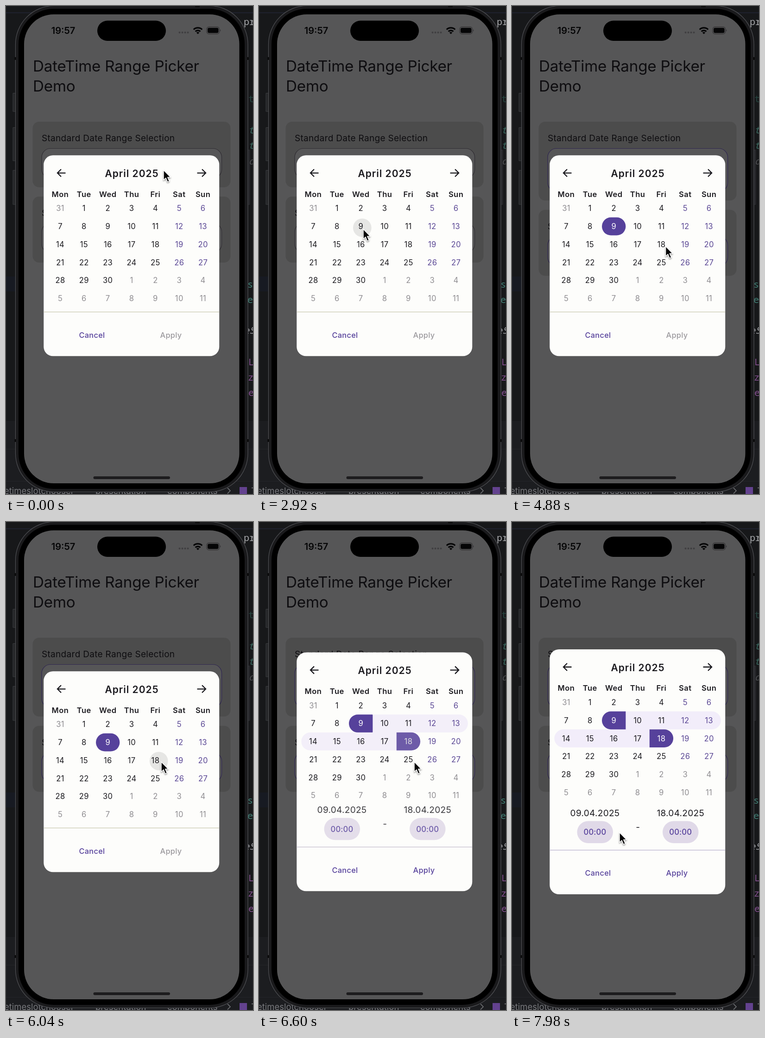
An HTML page for the animation above (8 s loop, 533 by 1050 pixels).

```html
<!DOCTYPE html>
<html lang="en">
<head>
<meta charset="utf-8">
<title>Date range picker</title>
<style>
  html, body { margin: 0; width: 100%; height: 100%; overflow: hidden; background: #17181a; }
  svg { display: block; width: 533px; height: 1050px; font-family: Inter, sans-serif; font-optical-sizing: none; }
  .code { font-family: "Noto Sans Mono", monospace; }
</style>
</head>
<body>
<svg id="stage" viewBox="0 0 533 1050" xmlns="http://www.w3.org/2000/svg">
  <rect width="533" height="1050" fill="#17181a"/>
  <g id="editor">
    <path d="M0 14.5H533" stroke="#20232f" stroke-width="2"/>
    <rect y="582" width="20" height="32" fill="#171a22"/>
    <rect y="893" width="533" height="157" fill="#1c1d20"/>
    <path d="M0 953.5H533M0 1022.5H533" stroke="#242529"/>
    <path d="M22 187.5H15V227H22M22 261.5H15V333H22M22 353.5H15V427H22" fill="#252628" stroke="#3b3c3f"/>
    <path d="M520 310H526V427H520" fill="#222326" stroke="#303134"/>
  </g>

  <g id="phone">
    <rect x="20.5" y="-0.5" width="501.5" height="1046" rx="83" fill="#1a1a1c" stroke="#505155" stroke-width="1.2"/>
    <rect x="27" y="6" width="488" height="1033" rx="76" fill="#000"/>
    <path d="M408 1H418M20 110V116M522 110V116M20 932V938M522 932V938" stroke="#090909" stroke-width="3"/>
    <rect x="39" y="18" width="464.5" height="1009" rx="64" fill="#565657"/>
    <rect x="197" y="31.5" width="148" height="43.5" rx="21.7" fill="#000"/>
    <g fill="#3f3e40">
      <circle cx="374.5" cy="57" r="2"/><circle cx="380.5" cy="57" r="2"/>
      <circle cx="386.5" cy="57" r="2"/><circle cx="392.5" cy="57" r="2"/>
    </g>
    <g fill="none" stroke="#050506" stroke-width="3.2">
      <path d="M404.8 50.6A13.4 13.4 0 0 1 423.2 50.6"/>
      <path d="M408.6 54.8A8 8 0 0 1 419.4 54.8"/>
    </g>
    <path d="M410.8 57.2A4.6 4.6 0 0 1 417.2 57.2L414 60.6Z" fill="#050506"/>
    <rect x="433" y="45" width="27.5" height="15" rx="4.8" fill="none" stroke="#343335" stroke-width="1.3"/>
    <rect x="435" y="47" width="23.5" height="11" rx="3" fill="#050506"/>
    <path d="M462 50Q464.6 52.5 462 55Z" fill="#343335"/>
    <rect x="188.5" y="1012" width="165.5" height="6" rx="3" fill="#1d1c1e"/>
  </g>

  <g id="cards">
    <rect x="57.5" y="249" width="427" rx="14" fill="#4c4c4c" class="card"/>
    <rect x="77" y="306.5" width="388.5" rx="19" fill="#565657" class="field"/>
    <g id="second">
      <rect x="57.5" y="410" width="427" height="142" rx="14" fill="#4c4c4c"/>
      <rect x="77" y="467" width="388.5" height="64" rx="19" fill="#565657" class="field"/>
    </g>
  </g>

  <rect id="dialog" x="81.3" width="378.9" rx="20" fill="#fdfdfb"/>
  <g id="calendar">
    <path d="M128.5 38H111M119 30L111 38L119 46M412.5 38H431M423 30L431 38L423 46"
      fill="none" stroke="#19181d" stroke-width="2.3"/>
    <g id="range" fill="#f2edfa"></g>
    <circle id="ripple" fill="#000"/>
    <g id="days"></g>
  </g>
  <g id="footer">
    <path id="divider" d="M81.5 0H460" stroke-width="1.3"/>
    <g id="times">
      <rect x="140.5" y="-62.5" width="77.5" height="47.5" rx="23.7" fill="#e0d9e8"/>
      <rect x="325" y="-62.5" width="77.5" height="47.5" rx="23.7" fill="#e0d9e8"/>
    </g>
  </g>
  <path id="cursor" d="M0 0V21.5L4.9 17L8.5 25.6L12.4 23.9L8.8 15.6H15.4Z" fill="#050505"
    stroke="#fff" stroke-width="1.5" stroke-linejoin="round" style="filter:drop-shadow(0 2px 1.5px #0006)"/>
</svg>

<script>
const LOOP = 8000;
const PURPLE = '#56419b', WEEKEND = '#5b4895', INK = '#1b1a1f', GREY = '#8f8d91';
const COLUMN = 51.35, ROW = 38.7, FIRST_X = 117, FIRST_Y = 114.2;
const $ = id => document.getElementById(id);

function add(parent, tag, attrs) {
  const node = document.createElementNS('http://www.w3.org/2000/svg', tag);
  set(node, attrs);
  parent.appendChild(node);
  return node;
}
function set(node, attrs) {
  for (const key in attrs) node.setAttribute(key, attrs[key]);
}
// Text whose capitals are centred vertically on y.
function label(parent, text, x, y, size, fill, { weight = 400, spacing = 0, anchor = 'middle', ...rest } = {}) {
  const node = add(parent, 'text', {
    x, y: y + size * 0.36, fill, 'font-size': size, 'font-weight': weight,
    'letter-spacing': spacing, 'text-anchor': anchor, ...rest
  });
  node.textContent = text;
  return node;
}
const left = { anchor: 'start' };
const cellX = col => FIRST_X + col * COLUMN;
const cellY = row => FIRST_Y + row * ROW;

// Editor fragments around the phone
const snippets = [
  ['pr', 513, 34, '#a9aaad'], ['t', 523, 200, '#26443f'], ['t', 523, 267, '#3a675e', 1], ['t', 523, 300, '#3a675e', 1],
  ['d', 524, 334, '#4c4d50', 1], ['st', 521, 599, '#428076'], ['er', 521, 632, '#428076'],
  ['eS', 513, 698, '#9a9b9f', 1], ['L', 523, 766, '#84508f'], ['z', 522, 799, '#84508f'], ['e', 523, 832, '#84508f']
];
for (const [text, x, y, fill, italic] of snippets)
  label($('editor'), text, x, y, 20, fill, { ...left, class: 'code', 'font-style': italic ? 'italic' : 'normal' });
const crumbs = [['etimeslotchooser', -4], ['presentation', 193], ['components', 348], ['T', 529]];
for (const [text, x] of crumbs) label($('editor'), text, x, 1043, 18.5, '#77787c', left);
add($('editor'), 'path', { d: 'M478 1037L484 1043L478 1049', fill: 'none', stroke: '#77787c', 'stroke-width': 1.5 });
add($('editor'), 'rect', { x: 504, y: 1035, width: 16, height: 16, fill: '#63428f' });

// App page
label($('phone'), '19:57', 123.5, 53, 20, '#050506', { weight: 600 });
label($('phone'), 'DateTime Range Picker', 58, 129.5, 33.2, '#0e0d10', { ...left, spacing: -0.2 });
label($('phone'), 'Demo', 58, 172.5, 33.2, '#0e0d10', { ...left, spacing: -0.2 });
label($('cards'), 'Standard Date Range Selection', 77, 284, 19, '#0e0d10', { ...left, spacing: 0.3 });
label($('second'), 'S', 77, 445.5, 19, '#0e0d10', left);

// Calendar
label($('calendar'), 'April 2025', 271.5, 39, 21, INK, { weight: 600, spacing: 1 });
['Mon', 'Tue', 'Wed', 'Thu', 'Fri', 'Sat', 'Sun'].forEach((name, col) =>
  label($('calendar'), name, cellX(col), 83.5, 16.5, INK, { weight: 600, spacing: 0.5 }));

const dayLabels = {};
for (let i = 0; i < 42; i++) {
  const col = i % 7, row = Math.floor(i / 7);
  const inMonth = i >= 1 && i <= 30;
  const day = i === 0 ? 31 : inMonth ? i : i - 30;
  const fill = !inMonth ? GREY : col > 4 ? WEEKEND : INK;
  const node = label($('days'), day, cellX(col), cellY(row), 16.6, fill, { spacing: 0.3 });
  if (inMonth) dayLabels[day] = node;
}

// A bar over columns from..to, rounded on the chosen sides.
function bar(from, to, row, leftRadius, rightRadius) {
  const x = cellX(from) - COLUMN / 2, w = (to - from + 1) * COLUMN;
  const y = cellY(row) - ROW / 2, a = leftRadius, b = rightRadius;
  return `M${x + a} ${y}h${w - a - b}a${b} ${b} 0 0 1 ${b} ${b}v${ROW - 2 * b}a${b} ${b} 0 0 1 ${-b} ${b}` +
    `h${a + b - w}a${a} ${a} 0 0 1 ${-a} ${-a}v${2 * a - ROW}a${a} ${a} 0 0 1 ${a} ${-a}z`;
}
const R = ROW / 2;
add($('range'), 'path', { d: bar(3, 6, 1, 0, R) + bar(0, 3, 2, R, 0) });
const startCell = add($('calendar'), 'path', { fill: PURPLE });
const endCell = add($('calendar'), 'path', { fill: PURPLE, d: bar(4, 4, 2, 0, R) });
$('calendar').append($('days'));

// Footer
label($('footer'), 'Cancel', 185.5, 49.5, 16.3, PURPLE, { weight: 500, spacing: 0.3 });
const apply = label($('footer'), 'Apply', 356, 49.5, 16.3, GREY, { weight: 500, spacing: 0.3 });
[['09.04.2025', 179], ['18.04.2025', 363.7]].forEach(([date, x]) => {
  label($('times'), date, x, -80, 19, INK, { spacing: 0.3 });
  label($('times'), '00:00', x, -38.5, 16.6, PURPLE, { weight: 500, spacing: 0.2 });
});
label($('times'), '-', 271.5, -50, 19, INK);

// Motion
const clamp = v => Math.max(0, Math.min(1, v));
const progress = (t, start, duration) => clamp((t - start) / duration);
const mix = (a, b, p) => a + (b - a) * p;
const smooth = p => p * p * (3 - 2 * p);
const blend = (a, b, p) => `color-mix(in srgb, ${b} ${p * 100}%, ${a})`;

const moves = [ // start, duration, x, y
  [0, 160, 230, 490], [1300, 400, 225, 480], [3760, 820, 331.5, 517], [5300, 400, 335, 516], [6900, 800, 232, 668]
];
const taps = [ // start, pointer x, pointer y, column, row
  [2820, 225, 158, 2, 1], [5940, 335, 194, 4, 2]
];
const FIRST_PICK = 3180, SECOND_PICK = 6300, FADE = 350;

function draw(t) {
  let x = 340, y = 353;
  for (const [start, duration, toX, toY] of moves) {
    const p = smooth(progress(t, start, duration));
    x = mix(x, toX, p);
    y = mix(y, toY, p);
  }
  $('cursor').setAttribute('transform', `translate(${x} ${y})`);

  const [tapStart, px, py, col, row] = taps[t < 4500 ? 0 : 1];
  const age = t - tapStart, grow = clamp(age / 240);
  const alpha = age < 0 ? 0 : 0.09 * clamp(age / 75) * (1 - progress(age, 200, 240));
  set($('ripple'), {
    cx: mix(px, cellX(col), grow), cy: mix(py, cellY(row), grow), r: mix(9.6, 34, grow), opacity: alpha
  });

  const first = progress(t, FIRST_PICK, FADE), second = progress(t, SECOND_PICK, FADE);
  const picked = t >= FIRST_PICK, extra = picked ? 28.5 : 0;
  set(document.querySelector('.card'), { height: 141 + extra });
  const fields = document.querySelectorAll('.field');
  fields[0].setAttribute('height', 64 + extra);
  fields.forEach(field => set(field, { stroke: picked ? '#2f2650' : '#302d33', 'stroke-width': 1.2 }));
  $('second').setAttribute('transform', `translate(0 ${extra})`);

  const top = 321.3 - 47.3 * second, height = 432 + 95 * second;
  set($('dialog'), { y: top, height });
  $('calendar').setAttribute('transform', `translate(0 ${top})`);
  $('footer').setAttribute('transform', `translate(0 ${top + height - 95})`);
  $('divider').style.stroke = blend('#c8c8b0', '#c3bcd4', second);

  set(startCell, { d: bar(2, 2, 1, R, R * (1 - smooth(second))), opacity: first });
  endCell.setAttribute('opacity', second);
  $('range').setAttribute('opacity', second);
  $('times').setAttribute('opacity', second);
  dayLabels[9].style.fill = blend(INK, '#fff', first);
  dayLabels[18].style.fill = blend(INK, '#fff', second);
  apply.style.fill = second > 0 ? PURPLE : '#9b999d';
}

const origin = performance.now();
function tick() {
  draw((performance.now() - origin) % LOOP);
  requestAnimationFrame(tick);
}
tick();
</script>
</body>
</html>
```
